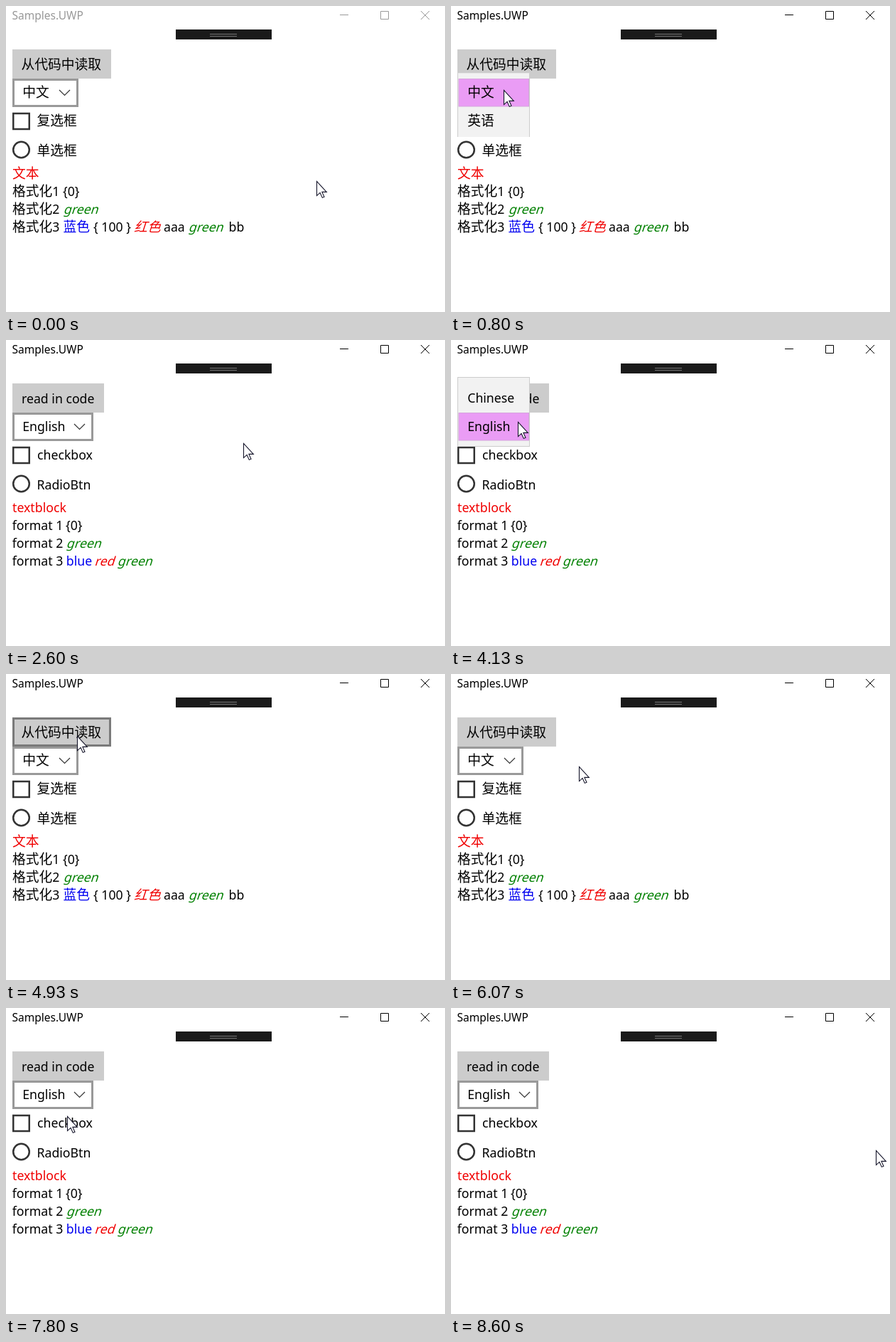
An HTML page for the animation above (9.14 s loop, 618x430 px).

```html
<!DOCTYPE html>
<html lang="zh-CN">
<head>
<meta charset="utf-8">
<title>Samples.UWP</title>
<style>
html, body { margin: 0; width: 100%; height: 100%; overflow: hidden; background: #fff; }
svg { display: block; width: 618px; height: 430px; }
text { font: 17.7px "Noto Sans", "Open Sans", sans-serif; }
.cjk { font: 18.75px "Noto Sans CJK SC", "Noto Sans CJK", sans-serif; }
#title { font-size: 15.5px; stroke: none; }
.line { fill: none; }
</style>
</head>
<body>
<svg viewBox="0 0 618 430">
  <defs><clipPath id="clip"><rect id="clipBox" x="9" width="103"/></clipPath></defs>
  <g id="chrome">
    <text id="title" x="8.5" y="18.6">Samples.UWP</text>
    <path class="line" d="M470 12.5h12M527.5 7.5h11v11h-11zM584 7l12 12m0-12l-12 12"/>
  </g>
  <path fill="#1a1a1a" d="M239 33h135v14h-135z"/>
  <path class="line" stroke="#777" d="M287 39.5h38M287 42.5h38"/>
  <g class="line" stroke="#333" stroke-width="2.5">
    <rect x="10.25" y="151" width="22.5" height="22"/>
    <circle cx="21.5" cy="202" r="11.3"/>
  </g>
  <g id="pages"></g>
  <g id="popups" clip-path="url(#clip)"></g>
  <path id="cursor" fill="#fff" stroke="#15152a" stroke-width="1.1"
    d="M.5.5V20.6L5.1 16.4 8.3 23.4 11 22.2 7.9 15.4H14.3Z"/>
</svg>
<script>
const LOOP = 9140;
const $ = id => document.getElementById(id);
const runs = s => s.replace(/[\u4e00-\u9fa5]+/g, m => `<tspan class="cjk">${m}</tspan>`);
const text = (x, y, s, fill = '#000', slant = 0) =>
  `<text transform="translate(${x} ${y}) skewX(${-slant})" fill="${fill}">${runs(s)}</text>`;
const rect = (cls, x, y, w, h, more) =>
  `<rect class="${cls}" x="${x}" y="${y}" width="${w}" height="${h}" ${more}/>`;

const RED = '#f00000', BLUE = '#0000f0', GREEN = '#008000', SLANT = 18;
const langs = [
  {
    btnW: 139, comboW: 93, top: 93, bottom: 190, rows: [102, 142], picked: 0,
    items: ['中文', '英语'],
    labels: [
      [21.5, 89, '从代码中读取'], [43.5, 168, '复选框'], [43.5, 210, '单选框'],
      [9, 242, '文本', RED], [9, 267, '格式化1'], [80, 267, '{0}'],
      [9, 292, '格式化2'], [80.5, 292, 'green', GREEN, SLANT],
      [9, 317, '格式化3'], [80.5, 317, '蓝色', BLUE], [123, 317, '{ 100 }'],
      [180, 317, '红色', RED, SLANT], [222, 317, 'aaa'],
      [256.5, 317, 'green', GREEN, SLANT], [313.5, 317, 'bb']
    ]
  },
  {
    btnW: 129, comboW: 114, top: 52, bottom: 150, rows: [62, 102], picked: 1,
    items: ['Chinese', 'English'],
    labels: [
      [22, 89, 'read in code'], [44, 168, 'checkbox'], [43.5, 210, 'RadioBtn'],
      [9, 242, 'textblock', RED], [8.7, 267, 'format 1'], [84, 267, '{0}'],
      [8.7, 292, 'format 2'], [84.6, 292, 'green', GREEN, SLANT],
      [8.7, 317, 'format 3'], [84.8, 317, 'blue', BLUE],
      [124.2, 317, 'red', RED, SLANT], [156.6, 317, 'green', GREEN, SLANT]
    ]
  }
];

function pageMarkup(l) {
  const cx = 9 + l.comboW - 27;
  return `<g>
    ${rect('btn', 9, 61, l.btnW, 41, 'fill="#ccc"')}
    ${rect('edge', 10.5, 62.5, l.btnW - 3, 38, 'fill="none" stroke="#7a7a7a" stroke-width="3"')}
    <g class="combo">
      ${rect('box', 10.5, 103.5, l.comboW - 3, 37, 'fill="#fff" stroke-width="3"')}
      <path class="line" stroke="#333" stroke-width="1.2" d="M${cx} 118l7.5 7.5 7.5-7.5"/>
      ${text(23.2, 128, l.items[l.picked])}
    </g>
    ${l.labels.map(a => text(...a)).join('')}
  </g>`;
}

function popupMarkup(l) {
  const items = l.items.map((s, i) =>
    rect('row', 11, l.rows[i] + .5, 98.5, 38.5, '') + text(23.2, l.rows[i] + 26, s)).join('');
  return `<g>${rect('pane', 9.5, l.top + .5, 101, l.bottom - l.top - 1, 'fill="#f2f2f2" stroke="#ccc"')}${items}</g>`;
}

$('pages').innerHTML = langs.map(pageMarkup).join('');
$('popups').innerHTML = langs.map(popupMarkup).join('');
const pages = [...$('pages').children], popups = [...$('popups').children];

// Times below are ticks of 1/15 s. Pointer: tick, x, y, 1 = steady speed to this point
const path = [
  [0, 437, 246], [9, 74, 118], [16, 74, 118], [21, 74, 149], [23, 74, 152], [24, 74, 152],
  [35, 379, 151], [36, 379, 151], [37, 384, 152], [39, 334, 145, 1], [48, 94, 124, 1],
  [50, 94, 127], [56, 94, 127], [62, 94, 115], [68, 100, 87], [74, 100, 87],
  [81, 324, 134], [83, 324, 134], [97, 86, 127], [105, 86, 127], [111, 86, 152],
  [117, 86, 152], [129, 598, 200], [137, 598, 200]
];
// Drop-down: opens, closes, language after closing
const drops = [[11, 25, 1], [51, 70, 0], [98, 117, 1]];
const OPEN_TICKS = 4;

function tickAt(ms) {
  let k = Math.ceil(ms * 3 / 200);
  while (Math.round(k * 20 / 3) * 10 > ms) k--;
  return k;
}

function pointer(k) {
  const i = Math.max(1, path.findIndex(p => p[0] >= k));
  const [t0, x0, y0] = path[i - 1], [t1, x1, y1, steady] = path[i];
  const u = (k - t0) / (t1 - t0), e = steady ? u : u * u * (3 - 2 * u);
  return [Math.round(x0 + (x1 - x0) * e), Math.round(y0 + (y1 - y0) * e)];
}

const show = (el, on) => el.setAttribute('display', on ? 'inline' : 'none');
const inside = ([x, y], left, top, w, h) => x >= left && x < left + w && y >= top && y < top + h;

function rowStyle(row, picked, hover) {
  const fill = picked ? (hover ? '#ea9cf5' : '#f7b6fd') : (hover ? '#dfdfdf' : 'none');
  row.setAttribute('fill', fill);
  row.setAttribute('stroke', !hover ? 'none' : picked ? '#d5a3dd' : '#c6c6c6');
}

function draw(ms) {
  const k = tickAt(ms), at = pointer(k);
  const past = drops.filter(d => k >= d[1]).pop();
  const n = past ? past[2] : 0, l = langs[n];
  const drop = drops.find(d => k >= d[0] && k < d[1]);

  const ink = k < drops[0][0] ? '#999' : '#000';
  $('chrome').setAttribute('fill', ink);
  $('chrome').setAttribute('stroke', ink);

  pages.forEach((p, i) => show(p, i === n));
  popups.forEach((p, i) => show(p, drop && i === n));
  const page = pages[n];
  show(page.querySelector('.edge'), !drop && inside(at, 9, 61, l.btnW, 41));
  show(page.querySelector('.combo'), !drop);
  page.querySelector('.box').setAttribute('stroke',
    inside(at, 9, 102, l.comboW, 40) ? '#666' : '#999');

  if (drop) {
    const u = Math.min(1, (k - drop[0] + 1) / OPEN_TICKS), e = 1 - (1 - u) ** 3;
    const top = 102 + (l.top - 102) * e, bottom = 142 + (l.bottom - 142) * e;
    $('clipBox').setAttribute('y', top);
    $('clipBox').setAttribute('height', bottom - top);
    popups[n].querySelectorAll('.row').forEach((row, i) =>
      rowStyle(row, i === l.picked, inside(at, 9, l.rows[i], 102, 40)));
  }
  $('cursor').setAttribute('transform', `translate(${at})`);
}

const start = performance.now();
function frame() {
  draw((performance.now() - start) % LOOP);
  requestAnimationFrame(frame);
}
frame();
</script>
</body>
</html>
```
